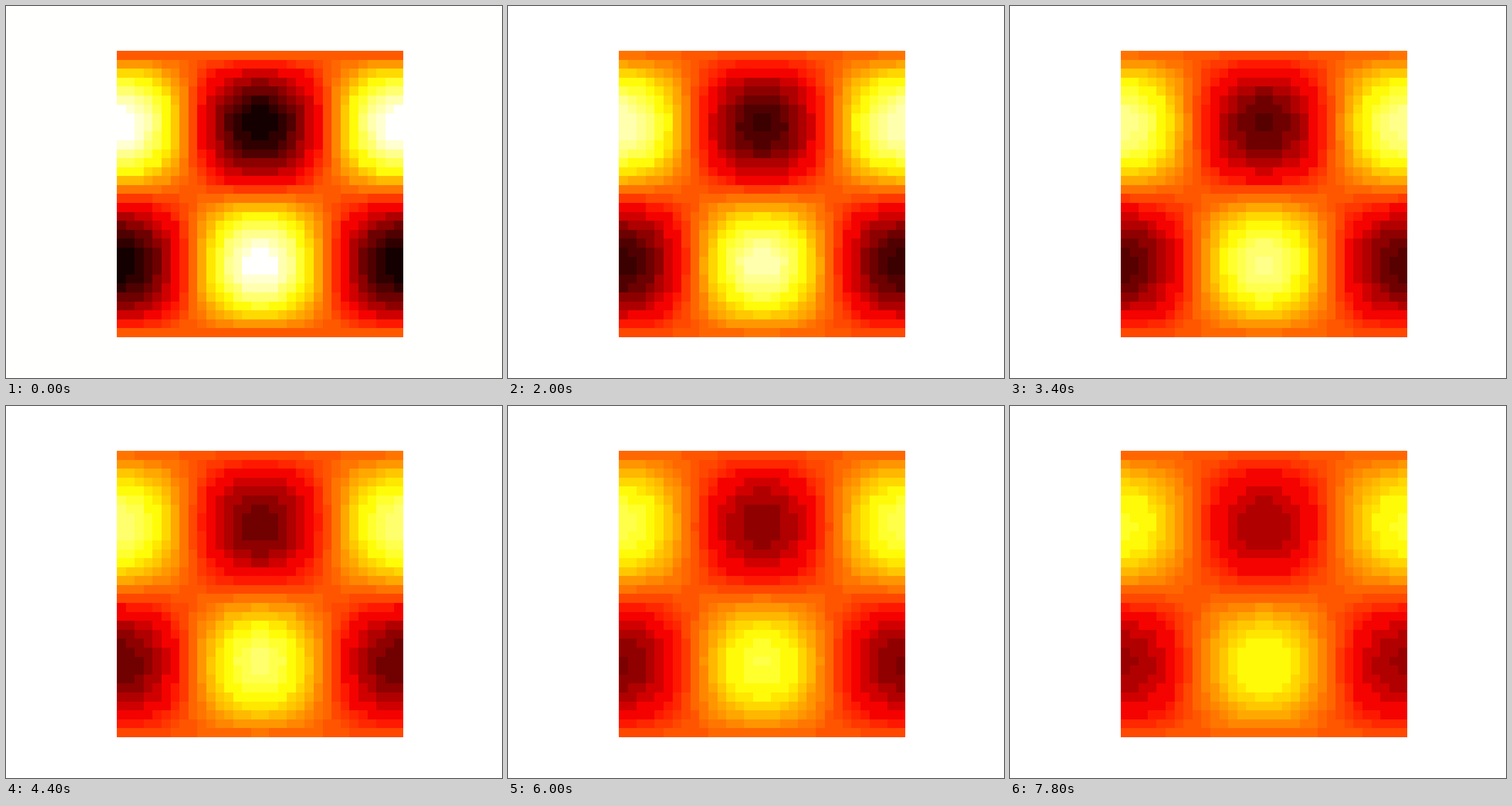
These frames come from a looping animation (864x648 px, 8 s). A matplotlib script:

```python
import numpy as np
import matplotlib.pyplot as plt
from matplotlib.animation import FuncAnimation

W, H, DPI = 864, 648, 135
N = 32            # grid cells per side
RATE = 0.19       # diffusion number of one step
FRAMES, STEP_MS = 40, 200

HOT = plt.get_cmap("hot")


def diffuse(u):
    """One explicit heat step on a periodic grid."""
    around = sum(np.roll(u, s, axis) for s in (1, -1) for axis in (0, 1))
    return u + RATE * (around - 4 * u)


def solve():
    s = np.linspace(0, 1, N)
    x, y = np.meshgrid(s, s)
    states = [np.sin(2 * np.pi * y) * np.cos(2 * np.pi * x)]
    while len(states) < FRAMES:
        states.append(diffuse(states[-1]))
    return states


def paint(u):
    """Colour the field in coarse bands (3 red, 4 green, 3 blue bits),
    each band shown in its mean colour. Returns cells and page colour."""
    cells = HOT((u + 1) / 2, bytes=True)[..., :3].reshape(-1, 3).astype(int)
    colors = np.vstack([cells, [255, 255, 255]])
    side = 0.77 * H
    weight = np.full(len(colors), (side / N) ** 2)
    weight[-1] = W * H - side ** 2

    r, g, b = colors.T
    key = (r >> 5) << 7 | (g >> 4) << 3 | b >> 5
    _, band = np.unique(key, return_inverse=True)
    total = np.bincount(band, weight)
    mean = np.stack([np.bincount(band, weight * c) / total for c in colors.T], 1)
    out = np.floor(mean + 1e-6).astype(np.uint8)[band]
    return out[:-1].reshape(N, N, 3), out[-1] / 255


pictures = [paint(u) for u in solve()]

fig = plt.figure(figsize=(W / DPI, H / DPI), dpi=DPI)
ax = fig.add_axes([0.125, 0.11, 0.775, 0.77])
image = ax.imshow(pictures[0][0], interpolation="nearest")
ax.axis("off")


def update(i):
    cells, page = pictures[i]
    image.set_data(cells)
    fig.patch.set_facecolor(tuple(page))
    return [image]


anim = FuncAnimation(fig, update, frames=FRAMES, interval=STEP_MS,
                     init_func=lambda: update(0), repeat=True, repeat_delay=0)
plt.show()
```
